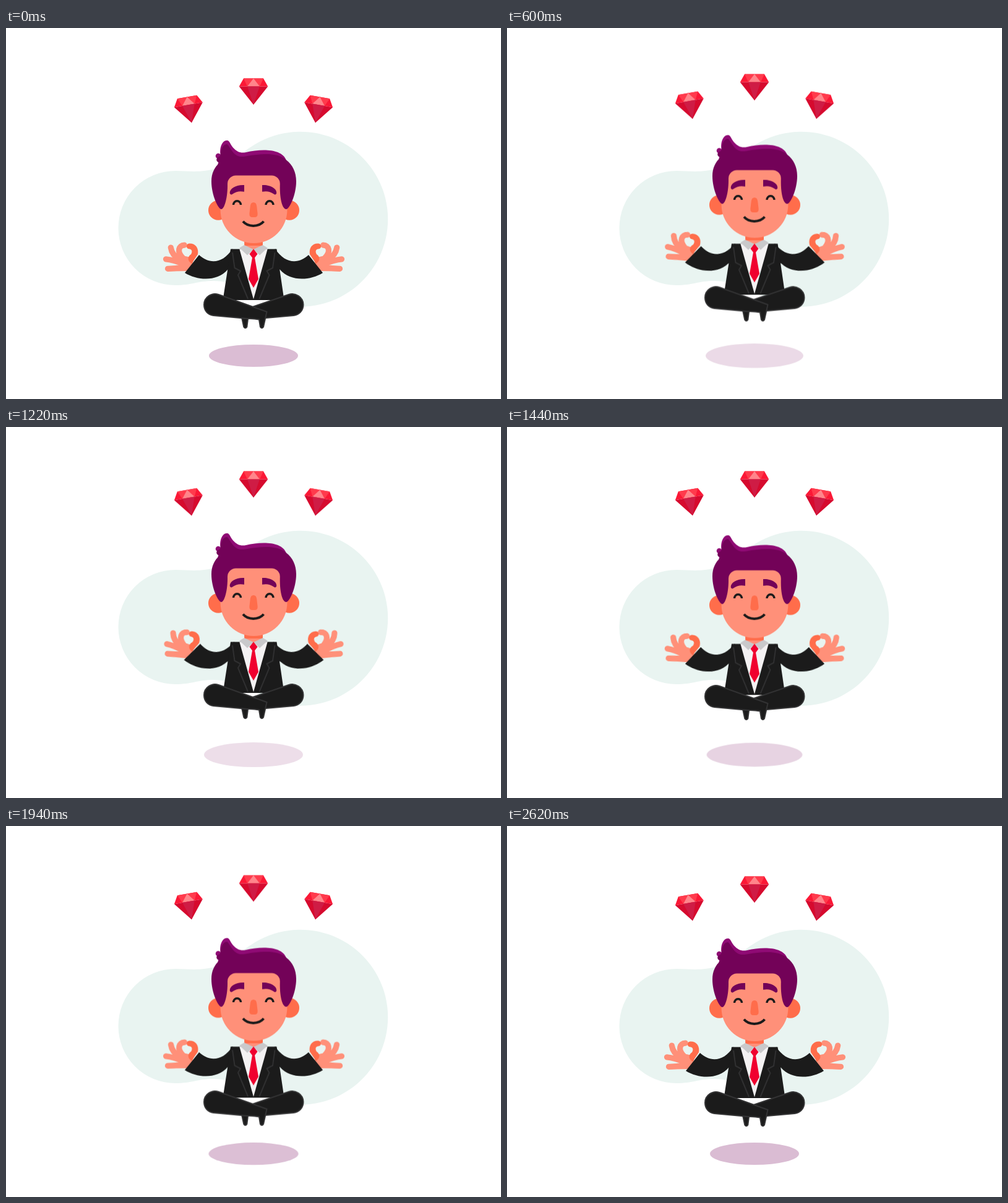
An HTML page for the animation above (2.66 s loop, 800x600 px).

```html
<!DOCTYPE html>
<html lang="en">
<head>
<meta charset="utf-8">
<title>Floating meditation</title>
<style>
  html, body { margin: 0; width: 100%; height: 100%; overflow: hidden; background: #fff; }
  svg { display: block; width: 100%; height: 100%; }
  .suit { fill: #1b1b1b; }
  .seam { fill: none; stroke: #303031; stroke-width: 2; }
  .leg { fill: #1b1b1b; stroke: #333334; stroke-width: 2; stroke-linejoin: round; }
  .skin { fill: #ff9079; }
  .blush { fill: #ff6d4b; }
  .finger { fill: none; stroke: #ff9079; stroke-width: 9.2; stroke-linecap: round; }
  .hair { fill: #730258; }
  .shine { fill: #8f0a74; }
  .line { fill: none; stroke: #1b1b1b; }
</style>
</head>
<body>
<svg viewBox="0 0 800 600">
  <defs>
    <g id="gem">
      <path fill="#fb1836" d="M-16-42.5H16L23.3-29.5H-23.3Z"/>
      <path fill="#ff3a4c" d="M-16-42.5H16L10-29.5H-10Z"/>
      <path fill="#ff858b" d="M0-42.5L10-29.5H-10Z"/>
      <path fill="#d60a2e" d="M-23.3-29.5H23.3L0 0Z"/>
      <path fill="#cf1c45" d="M-10-29.5H10L0 0Z"/>
    </g>
    <g id="arm">
      <path class="skin" d="M276 371L290 369L303 372L300 393L262 393.5L284 384Z"/>
      <path class="finger" d="M258.5 373.8Q270 375 286 381M261.5 389.3Q276 389 290 386M266.3 355Q268 367 281 375M288.3 351.2C279 351.5 275.5 362 286 372"/>
      <path class="blush" d="M296 348.6C306 348 312 356 310 366L300 381C292 376 294 369 299 366C302 361 300 357.5 295.5 357.3A4.4 4.4 0 0 1 296 348.6Z"/>
      <path class="suit" d="M312 367C328 382 350 382 366 357L372 380L358 391C342 410 310 409 289 396Z"/>
    </g>
    <path id="lapel" class="seam" d="M366 363L369.5 388L379 393L375 399.5L391 438"/>
    <path id="collar" fill="#c9c9cb" d="M377.3 355.5L385 351L400 358L390 367.5Z"/>
    <path id="brow" class="hair" d="M385 254C372 253 360.5 260 361.8 267.5Q363.5 271 367 268C372 264.3 378 263.3 385 264.8Z"/>
  </defs>

  <path fill="#e9f4f1" d="M274 231C298 231 312 235 345 226C370 219 380 201 396 192.3A141.5 141.5 0 1 1 476 450.7C420 450 390 409 335 409C310 409 300 416 274 416A92.5 92.5 0 0 1 274 231Z"/>

  <ellipse id="shadow" cx="400" cy="530" rx="72" ry="18" fill="#730258"/>

  <g id="gemMid"><use href="#gem" transform="translate(400 124)"/></g>
  <g id="gemSide">
    <use href="#gem" transform="translate(300 153.3) rotate(-10)"/>
    <use href="#gem" transform="translate(500 153.3) rotate(10)"/>
  </g>

  <g id="body">
    <use class="arm" href="#arm"/>
    <g transform="matrix(-1 0 0 1 801 0)"><use class="arm" href="#arm"/></g>
    <path class="suit" d="M363 357.5H437.5L442.5 392L449.5 440H350.5L358 392Z"/>
    <path fill="#f4f2f3" d="M377.3 357.5H422.7L400 438.5Z"/>
    <path class="skin" d="M385.3 340H415V354L400 362L385.3 354Z"/>
    <path class="blush" d="M385.3 340H415V352H385.3Z"/>
    <use href="#collar"/>
    <use href="#collar" transform="matrix(-1 0 0 1 800 0)"/>
    <path fill="#f0002f" d="M400 357.5L406.5 365.5L402 371.5L408 406L400 420L392 406L398 371.5L393.5 365.5Z"/>
    <use href="#lapel"/>
    <use href="#lapel" transform="matrix(-1 0 0 1 800.5 0)"/>
  </g>

  <g id="legs">
    <path class="leg" d="M381 468L384.3 483.5Q386.8 487 389.3 483.5L391.3 468Z"/>
    <path class="leg" d="M457 431C468 427.5 480.5 435.5 480.5 447.5C480.5 457 474 464 465 465L420 469L385 470L372 460Z"/>
    <path class="leg" d="M343.5 431C332 427.5 320 435.5 320 447.5C320 457 326 464 335 465L390 470Q400 469.5 409 471.5L411 483.5Q413.5 487 416 483.5L421.5 459Z"/>
  </g>

  <g id="head">
    <circle class="blush" cx="343" cy="294.7" r="16"/>
    <circle class="blush" cx="458" cy="294.7" r="16"/>
    <path class="skin" d="M346.5 236H454.5V294A54 54 0 0 1 346.5 294Z"/>
    <circle class="shine" cx="343" cy="207" r="4.3"/>
    <path class="shine" d="M342 222L346.5 204C345 192 350 182 357 181.8C361.500 181.8 362 188 367 193.500C373 200 379 203 388 201C412 195.500 446 194.500 453 214L440 226Z"/>
    <path class="hair" d="M348 293C343 293 332 270 332 248C332 235 337 225 345.5 217.500C339 217.500 338.500 210 344 208.500C347 207 346.500 205 347 202C348 193 352 188 357 188C360 189 364 199 370 204C376 209 382 208.700 390 207C412 203 440 201 453 213.500C463 221 469 233 469 248C469 270 458 293 453 293C446 293 442 274 442.800 252A13.500 13.500 0 0 0 429 238.500H372A13.500 13.500 0 0 0 358 252C358.500 274 353 293 348 293Z"/>
  </g>
  <g id="brows">
    <use href="#brow"/>
    <use href="#brow" transform="matrix(-1 0 0 1 799 0)"/>
  </g>
  <path id="eyes" class="line" stroke-width="3.5" d="M367.500 286A6 6.200 0 0 1 379.500 286M420 286A6 6.200 0 0 1 432 286"/>
  <path id="nose" class="blush" d="M394.800 288Q395.500 282 400 282Q404.500 282 405.200 288L406.600 300Q407 306 402 306H398Q393 306 393.400 300Z"/>
  <path id="mouth" class="line" stroke-width="4" d="M383 312.800C391 322.300 408.500 322.300 416.500 312.800"/>
</svg>
<script>
  const LOOP = 2660, HALF = 1200;
  const EASE = 'cubic-bezier(.33, 0, 0, 1)';

  // Go from low to high and back, starting after a delay within the loop.
  function sway(el, low, high, delay = 0) {
    const at = ms => (delay + ms) / LOOP;
    el.animate([
      { ...low, offset: 0 },
      { ...low, offset: at(0), easing: EASE },
      { ...high, offset: at(HALF), easing: EASE },
      { ...low, offset: at(2 * HALF) },
      { ...low, offset: 1 }
    ], { duration: LOOP, iterations: Infinity });
  }

  // id, height in px, delay in ms
  const lifts = [
    ['body', 10, 0], ['head', 10, 0], ['brows', 10, 40], ['legs', 14, 60],
    ['eyes', 10, 80], ['nose', 10, 120], ['mouth', 10, 160],
    ['gemMid', 10, 200], ['gemSide', 10, 240]
  ];
  for (const [id, height, delay] of lifts) {
    sway(document.getElementById(id),
      { transform: 'translateY(0px)' },
      { transform: `translateY(${-height}px)` }, delay);
  }

  for (const arm of document.querySelectorAll('.arm')) {
    arm.style.transformOrigin = '365px 380px';
    sway(arm, { transform: 'rotate(0deg)' }, { transform: 'rotate(7deg)' });
  }

  const shadow = document.getElementById('shadow');
  shadow.style.transformOrigin = '400px 530px';
  sway(shadow,
    { transform: 'scale(1)', opacity: 0.26 },
    { transform: 'scale(1.111)', opacity: 0.13 });
</script>
</body>
</html>
```
